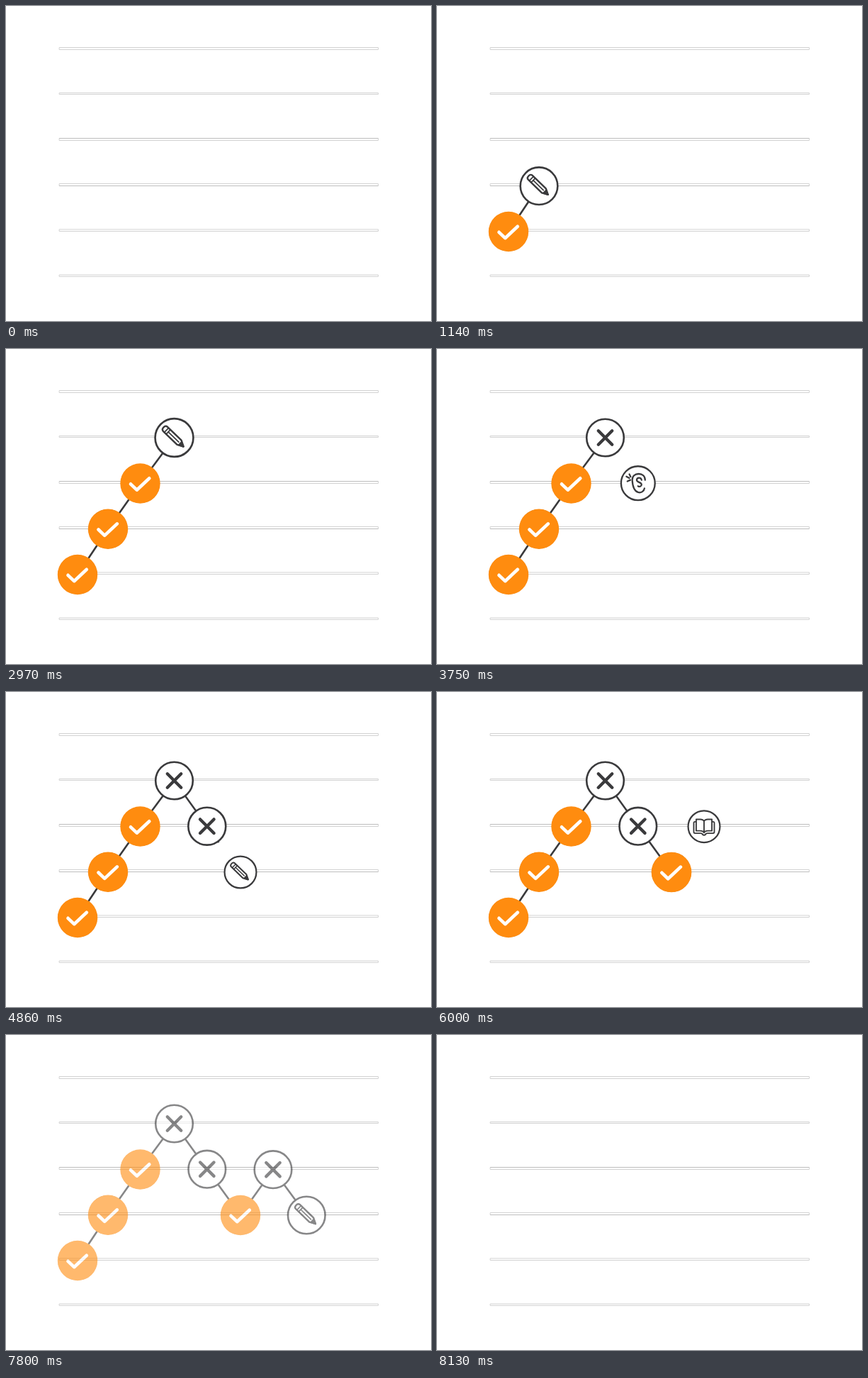
Write an HTML page that moves like this. It is 600 by 444 pixels and loops after 8.16 s.

```html
<!DOCTYPE html>
<html lang="en">
<head>
<meta charset="utf-8">
<title>Answer path</title>
<style>
  html, body { margin: 0; width: 100%; height: 100%; overflow: hidden; background: #fff; }
  svg { display: block; width: 100vw; height: 100vh; }
</style>
</head>
<body>
<svg id="stage" viewBox="0 0 600 444" fill="none" stroke-linecap="round" stroke-linejoin="round">
  <defs>
    <g id="pencil" transform="translate(-1 -1) rotate(44)" stroke="#3a3a3c" stroke-width="2.4">
      <path d="M-15.500 -4.200H11L19 0L11 4.200H-15.500Q-19 4.200 -19 0T-15.500 -4.200Z"/>
      <path d="M-13.500 -4V4M-10 -4V4M-9 0H10" stroke-width="1.700"/>
      <path d="M13 -2.600L19 0L13 2.600Z" fill="#3a3a3c"/>
    </g>
    <g id="book" stroke="#3a3a3c" stroke-width="2.200">
      <path d="M0 -9Q-2 -12 -6 -12H-13V7H-6Q-2 7 0 10Q2 7 6 7H13V-12H6Q2 -12 0 -9V10"/>
      <path d="M-13 -8H-15Q-17 -8 -17 -6V9Q-17 11 -15 11H-6Q-3 11 -2.500 13Q0 15.500 2.500 13Q3 11 6 11H15Q17 11 17 9V-6Q17 -8 15 -8H13"/>
    </g>
    <g id="ear" stroke="#3a3a3c" stroke-width="2.500">
      <path d="M11 -5C11 -11 7 -14.500 1 -14.500C-5 -14.500 -9 -11 -9 -5C-8.500 4 -6 12 0 14C5 15.500 9.500 12 10 8"/>
      <path d="M5.500 -5C4.500 -10 -2 -9 -2 -5C-2 -1 5 -2 5.500 2C5.500 5 2 6 0 4.500"/>
      <path d="M-13.500 -14L-11.500 -10M-18 -10.500L-13.500 -8M-16.500 -3L-12 -5"/>
    </g>
  </defs>
  <g id="grid" stroke="#d2d2d2"></g>
  <g id="path">
    <g id="links" stroke="#3a3a3c" stroke-width="2.600" stroke-linecap="butt"></g>
    <g id="nodes"></g>
  </g>
</svg>
<script>
const LOOP = 8160;
const NS = 'http://www.w3.org/2000/svg';
const $ = id => document.getElementById(id);

// answered: when the node gets its result and the next one starts to grow
const nodes = [
  { x: 101, y: 318, icon: 'ear', right: true, answered: 390 },
  { x: 144, y: 253.7, icon: 'pencil', right: true, answered: 1660 },
  { x: 189.5, y: 189.5, icon: 'book', right: true, answered: 2400 },
  { x: 237.5, y: 125, icon: 'pencil', right: false, answered: 3370, lag: 40 },
  { x: 283.8, y: 189.2, icon: 'ear', right: false, answered: 4510 },
  { x: 331, y: 254, icon: 'pencil', right: true, answered: 5650 },
  { x: 377, y: 189.7, icon: 'book', right: false, answered: 6700 },
  { x: 424.3, y: 254, icon: 'pencil', answered: Infinity }
];

function add(parent, tag, attrs) {
  const el = document.createElementNS(NS, tag);
  for (const key in attrs) el.setAttribute(key, attrs[key]);
  return parent.appendChild(el);
}

const clamp = v => Math.max(0, Math.min(1, v));
const part = (t, from, to) => clamp((t - from) / (to - from));
const smooth = p => p * p * (3 - 2 * p);

// Swells a little past full size, then settles.
function grow(age) {
  if (age <= 0) return 0;
  if (age < 520) return 1.04 * Math.sin(Math.PI / 2 * Math.pow(age / 520, 1.25));
  return 1.04 - 0.04 * smooth(part(age, 520, 640));
}

function pop(age) {
  const up = Math.sin(Math.PI / 2 * part(age, 0, 150));
  return 1 + 0.29 * (up - smooth(part(age, 150, 370)));
}

function buildGrid() {
  const bands = [[58.5, 61.5], [122.5, 124.5], [186.5, 189.5], [250.5, 253.5], [314.9, 317.5], [379, 381.3]];
  bands.forEach(([top, bottom], i) => {
    add($('grid'), 'rect', { x: 75.5, y: top, width: 450, height: bottom - top });
    if (i === 2 || i === 3) {
      add($('grid'), 'path', { d: `M75.5 ${i === 2 ? top : bottom}H525`, stroke: '#bcbcbc' });
    }
  });
}

function buildNode(n, i) {
  if (i < nodes.length - 1) n.link = add($('links'), 'line', { x1: n.x, y1: n.y });
  n.el = add($('nodes'), 'g', {});
  add(n.el, 'circle', { r: 26.3, fill: '#fff', stroke: '#3a3a3c', 'stroke-width': 2.6 });
  n.before = add(n.el, 'use', { href: '#' + n.icon });
  n.after = add(n.el, 'g', {});
  if (n.right) {
    add(n.after, 'circle', { r: 28.2, fill: '#ff8c0f' });
    add(n.after, 'path', { d: 'M-13.5 0.8L-4.800 9.200L12.800 -7.300', stroke: '#fff', 'stroke-width': 4.6 });
  } else {
    add(n.after, 'path', { d: 'M-9.700 -9.700L9.700 9.700M9.700 -9.700L-9.700 9.700', stroke: '#3a3a3c', 'stroke-width': 4.4 });
  }
}

function drawNode(n, i, t) {
  const prev = nodes[i - 1];
  const age = prev ? t - prev.answered : (t - 45) * 640 / 345;
  const since = t - n.answered;
  const size = grow(age) * pop(since);
  const done = part(since, 0, 120);
  n.el.setAttribute('transform', `translate(${n.x} ${n.y}) scale(${size})`);
  n.el.setAttribute('visibility', size > 0 ? 'visible' : 'hidden');
  n.before.setAttribute('opacity', 1 - done);
  n.after.setAttribute('opacity', done);

  if (!n.link) return;
  const next = nodes[i + 1];
  const reach = part(since - (n.lag || 0), 270, 500);
  n.link.setAttribute('x2', n.x + (next.x - n.x) * reach);
  n.link.setAttribute('y2', n.y + (next.y - n.y) * reach);
  n.link.setAttribute('visibility', reach > 0 ? 'visible' : 'hidden');
}

function draw(t) {
  nodes.forEach((n, i) => drawNode(n, i, t));
  $('path').setAttribute('opacity', 1 - part(t, 7600, 8115));
}

function tick() {
  draw(performance.now() % LOOP);
  requestAnimationFrame(tick);
}

buildGrid();
nodes.forEach(buildNode);
tick();
</script>
</body>
</html>
```
